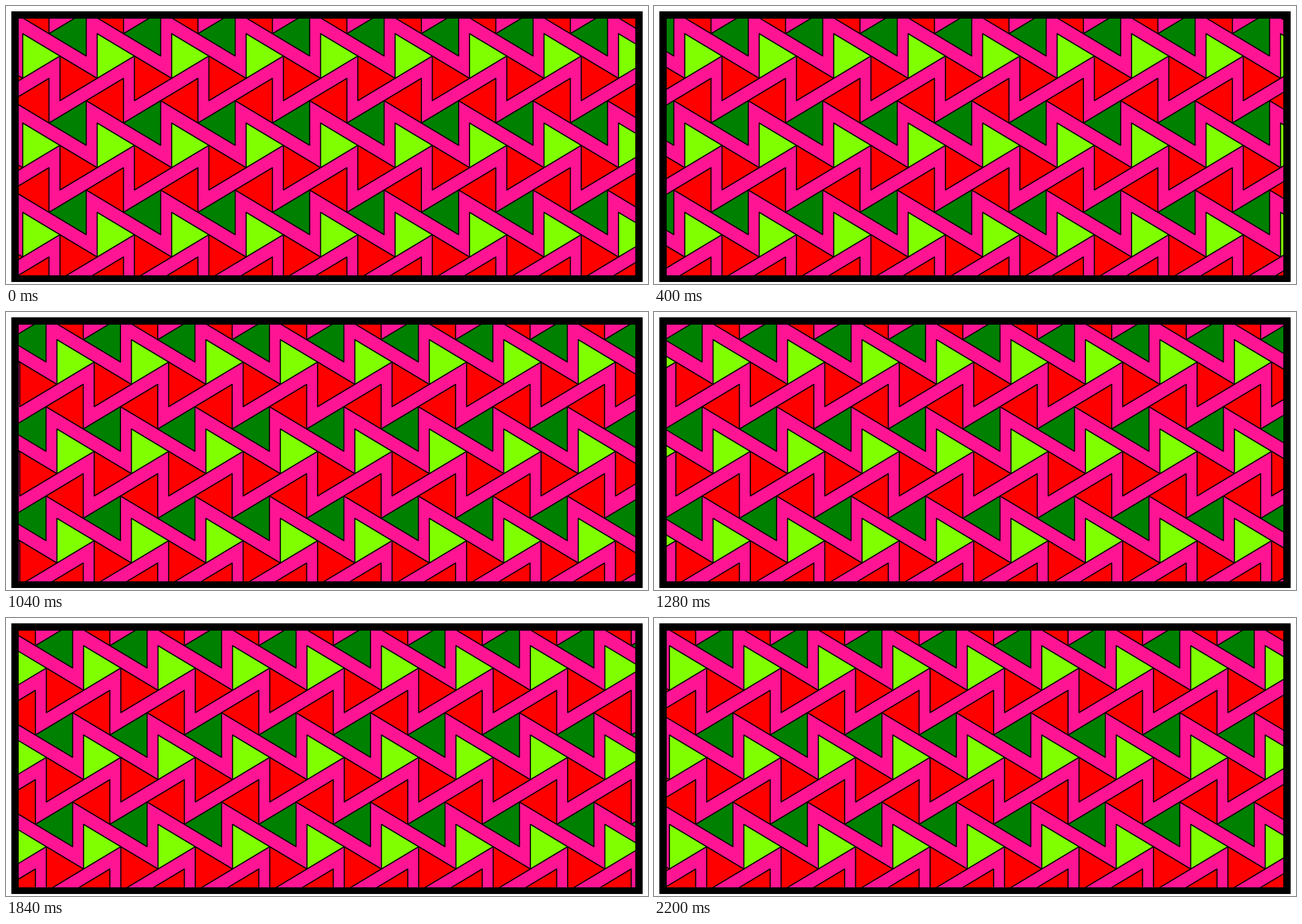
These frames come from a looping animation (960 px wide and 417 px high, 2.24 s). An HTML page with a canvas:

```html
<!DOCTYPE html>
<html lang="en">
<head>
<meta charset="utf-8">
<title>Sliding triangle pattern</title>
<style>
html, body { margin: 0; height: 100%; overflow: hidden; background: #fff; }
canvas { display: block; }
</style>
</head>
<body>
<canvas id="stage" width="960" height="417"></canvas>
<script>
const ctx = document.getElementById('stage').getContext('2d');
const LOOP = 2240, STEP = 40;
const W = 111.36, H = 134;          // pattern period
const w = W / 2, h = H / 4;         // triangle depth and half side
// [time, shift]: a nearly even slide by one period
const path = [[0, 0], [400, 21], [760, 38], [1040, 51.2], [1520, 75.5],
  [1840, 91], [2200, 109.4], [LOOP, W]];

function shiftAt(t) {
  const i = path.findIndex(p => p[0] > t);
  const [t0, x0] = path[i - 1], [t1, x1] = path[i];
  return x0 + (x1 - x0) * (t - t0) / (t1 - t0);
}

// Upright side starts at (x, y); dir is 1 for a tip on the right, -1 for the left
function triangle(x, y, dir, color) {
  ctx.beginPath();
  ctx.moveTo(x, y);
  ctx.lineTo(x, y + 2 * h);
  ctx.lineTo(x + dir * w, y + h);
  ctx.closePath();
  ctx.fillStyle = color;
  ctx.fill();
  ctx.stroke();
}

function draw(t) {
  const shift = shiftAt(t);
  ctx.fillStyle = '#000';
  ctx.fillRect(8, 8, 944, 406);
  ctx.save();
  ctx.beginPath();
  ctx.rect(19, 19, 922, 385);
  ctx.clip();
  ctx.fillStyle = '#ff1493';
  ctx.fillRect(19, 19, 922, 385);
  ctx.lineWidth = 1.6;
  ctx.lineJoin = 'round';
  for (let row = -1; row < 3; row++) {
    for (let col = -2; col < 9; col++) {
      const x = 25 + shift + col * W, y = 41.5 + row * H;
      triangle(x, y, 1, '#7fff00');
      triangle(x + w, y + h, 1, '#f00');
      triangle(x + 39.3, y + 2 * h, -1, '#f00');
      triangle(x + 39.3 + w, y + 3 * h, -1, '#008000');
    }
  }
  ctx.restore();
}

function frame() {
  const t = performance.now() % LOOP;
  draw(Math.floor(t / STEP) * STEP);
  requestAnimationFrame(frame);
}
frame();
</script>
</body>
</html>
```
